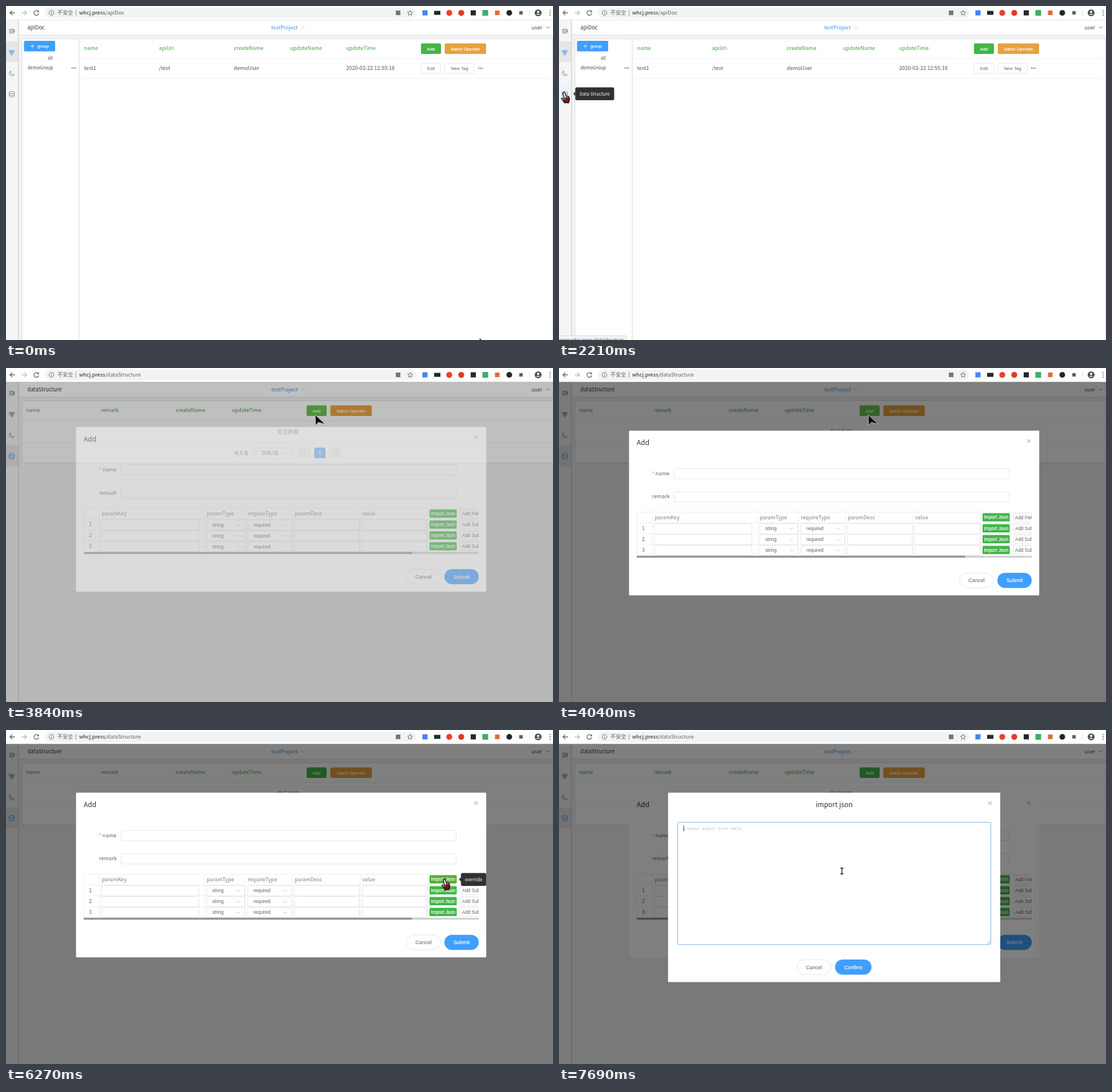
These frames come from a looping animation (957 by 585 pixels, 8000 ms). An HTML page:

```html
<!DOCTYPE html>
<html lang="zh-CN">
<head>
<meta charset="utf-8">
<title>apiDoc</title>
<style>
html, body { margin: 0; width: 100%; height: 100%; overflow: hidden; background: #fff; }
svg { display: block; width: 100vw; height: 100vh; }
text { font-family: "Noto Sans CJK SC", "Noto Sans CJK JP", "Noto Sans", sans-serif; white-space: pre; }
.ui { font-family: "Liberation Sans", Arial, sans-serif; }
.mono { font-family: "Liberation Mono", monospace; }
</style>
</head>
<body>
<svg id="stage" viewBox="0 0 957 585" preserveAspectRatio="none"></svg>
<script>
const BLUE = '#409eff', GREEN = '#43b549', ORANGE = '#e6a23c', LINE = '#dcdfe6', SOFT = '#ebeef5';
const GREY = '#606266', DARK = '#303133', HEAD = '#43a047', ICON = '#7c8086';

// Markup helpers; text is placed by its vertical centre.
const rect = (x, y, w, h, fill, stroke = 'none', r = 0, more = '') =>
  `<rect x="${x}" y="${y}" width="${w}" height="${h}" rx="${r}" fill="${fill}" stroke="${stroke}" stroke-width=".8" ${more}/>`;
const text = (x, y, s, fill = GREY, size = 9.2, more = '') =>
  `<text x="${x}" y="${y + size * .36}" font-size="${size}" fill="${fill}" ${more}>${s}</text>`;
const path = (d, stroke, w = .9, fill = 'none', more = '') =>
  `<path d="${d}" fill="${fill}" stroke="${stroke}" stroke-width="${w}" ${more}/>`;
const dot = (x, y, r, fill, stroke = 'none') =>
  `<circle cx="${x}" cy="${y}" r="${r}" fill="${fill}" stroke="${stroke}" stroke-width=".9"/>`;
const group = (id, body, more = '') => `<g id="${id}" ${more}>${body}</g>`;
const each = (list, fn) => list.map(fn).join('');
const hLine = (x, y, x2, c = SOFT) => path(`M${x} ${y}H${x2}`, c, .9);
const vLine = (x, y, y2, c = SOFT) => path(`M${x} ${y}V${y2}`, c, .9);
const down = (x, y, c, s = 3) => path(`M${x - s} ${y - s / 2}l${s} ${s}l${s} ${-s}`, c, .8);
const dots = (x, y) => each([-3, 0, 3], d => dot(x + d, y, 1, GREY));
const cross = (x, y) => path(`M${x - 3} ${y - 3}l6 6m0 -6l-6 6`, '#909399', .9);

function button(x, y, w, h, label, fill, size = 7.87, r = 2, id = '') {
  const plain = fill === '#fff';
  const ink = plain ? GREY : '#fff';
  return rect(x, y, w, h, fill, plain ? LINE : 'none', r, id && `id="${id}"`) +
    text(x + w / 2, y + h / 2, label, ink, size,
      `class="ui" text-anchor="middle" stroke="${ink}" stroke-width="${plain ? 0 : .2}"`);
}

function browserBar() {
  const ink = '#5f6368';
  return rect(0, 0, 957, 24.5, '#fff') + rect(68, 3, 650, 18, '#f1f3f4', 'none', 9) +
    path('M15.5 12H7M11 8l-4 4l4 4', ink, 1.3) +
    path('M27.500 12H36M32 8l4 4l-4 4', '#b9bcc0', 1.3) +
    path('M56.600 9.600A4.200 4.200 0 1 0 57.300 13', ink, 1.3) + path('M57.600 7.500v3.500h-3.500z', 'none', 0, ink) +
    dot(79.500, 12, 4.200, 'none', ink) + path('M79.500 11.300v3M79.500 9.300v1', ink, 1) +
    text(90, 12, '不安全', ink) + vLine(122.500, 7, 17, '#8a8d91') +
    `<text x="128" y="15.300" font-size="9.200" fill="#202124">whcj.press<tspan id="url" fill="${ink}"></tspan></text>` +
    rect(682, 8, 8, 8, '#74777b') +
    path('M707 7.500l1.300 3l3.200 .3l-2.400 2.100l.7 3.200l-2.800 -1.700l-2.800 1.700l.7 -3.200l-2.400 -2.100l3.200 -.3z', ink, .9) +
    rect(728.500, 7.500, 9, 9, '#4285f4') + rect(749, 8.500, 11, 7, '#24292e') +
    dot(775.500, 12, 5.200, '#e8432d') + dot(796.500, 12, 5.200, '#e23c20') +
    rect(813, 7.500, 9, 9, '#25282c') + rect(833.500, 7, 10, 10, '#3fae63') +
    rect(855.500, 8, 8, 8, '#e06a3a') + dot(880.500, 12, 5, '#22252b') + rect(898, 9, 6, 6, '#606266') +
    vLine(916, 7, 17, '#d0d3d6') + dot(931, 12, 6, '#4a4e54') + dot(931, 10.200, 2, '#fff') +
    path('M927.300 15.300a3.900 2.600 0 0 1 7.400 0z', 'none', 0, '#fff') +
    each([8, 12, 16], y => dot(952, y, 1, ink));
}

function sidebar() {
  const grape = each([[-3, -2], [0, -2], [3, -2], [-1.6, .8], [1.6, .8], [0, 3.500]],
    ([x, y]) => `<circle cx="${10 + x}" cy="${81 + y}" r="1.500"/>`);
  const store = '<ellipse cx="10" cy="151.500" rx="4.500" ry="2"/>' +
    '<path d="M5.500 151.500v6c0 2.700 9 2.700 9 0v-6M5.500 154.500c0 2.700 9 2.700 9 0"/>';
  return rect(0, 25, 22, 560, '#f5f5f5') +
    rect(0, 62, 21.500, 36.500, '#e6e6e6', 'none', 0, 'id="active"') +
    rect(0, 135.500, 21.500, 36.500, '#ecf5ff', 'none', 0, 'id="hover"') +
    vLine(22, 25, 585, '#bfc2c7') +
    path('M5.500 41h9M5.500 44h6M5.500 47h9M14.500 42.700v2.600l-1.800 -1.300z', '#55595f', 1) +
    group('grape', grape, 'fill="none" stroke-width=".9"') +
    path('M8.300 113.500a4.600 4.600 0 1 0 6 6.500a5 5 0 0 1 -6 -6.500z', ICON, .9) +
    group('store', store, 'fill="none" stroke-width=".9"');
}

const header = () => rect(22.500, 24.500, 935, 26.500, '#fff') + hLine(0, 24.500, 957, '#dfe1e4') +
  hLine(22, 51, 957, '#d9dbdf') +
  text(37.500, 37.500, '', '#303a45', 9.3, 'id="title"') + text(464, 37.500, 'testProject', '#3f9ae6') +
  down(519.500, 37.500, '#8fc2ec') + text(919.500, 37.500, 'user', '#41474f') + down(948, 37.500, GREY);

const headings = (list, y = 74) => each(list, ([x, s]) => text(x, y, s, HEAD));

const apiPage = () => rect(28, 57.500, 928.500, 540, '#fff', '#d4d6da') +
  rect(127, 58, 2.500, 530, '#eceef0') + hLine(129, 92, 956) + hLine(129, 126.800, 956) +
  button(31.500, 61, 54.500, 18.500, '', BLUE) + path('M43 70.200h6.500M46.200 67v6.500', '#fff', .8) +
  text(55, 70.200, 'group', '#fff', 7.87, 'class="ui" stroke="#fff" stroke-width=".2"') +
  text(73, 91.500, 'all', '#41474f', 7.87) + text(38, 108.500, 'demoGroup', '#41474f', 7.87) + dots(118.500, 108.500) +
  headings([[136.500, 'name'], [267.500, 'apiUri'], [398.500, 'createName'], [497, 'updateName'], [595, 'updateTime']]) +
  each([[136.500, 'test1'], [267.500, '/test'], [398.500, 'demoUser'], [595, '2020-02-22 12:55:18']],
    ([x, s]) => text(x, 109, s, '#50545a')) +
  button(726, 65.500, 35, 18.500, 'Add', GREEN) + button(767.500, 65.500, 72.500, 18.500, 'Batch Operate', ORANGE) +
  button(726.400, 100.400, 34.300, 18, 'Edit', '#fff') + button(767.900, 100.400, 51, 18, 'New Tag', '#fff') + dots(830, 109);

const dataPage = () => rect(28, 57.500, 940, 108.700, '#fff', '#d4d6da') +
  hLine(28, 92, 957) + hLine(28, 131.500, 957) +
  headings([[35, 'name'], [166, 'remark'], [297, 'createName'], [395, 'updateTime']]) +
  button(526, 65.500, 35, 18.500, 'Add', GREEN, 7.87, 2, 'add') +
  button(567.500, 65.500, 72.500, 18.500, 'Batch Operate', ORANGE) +
  text(475, 112, '暂无数据', '#808389') + text(399, 148.500, '共 0 条', GREY, 8.53) +
  rect(434.500, 140, 65.500, 18.300, '#fff', LINE, 2) + text(447, 149, '20条/页', GREY, 8.53) + down(491.500, 149, '#c0c4cc', 2.600) +
  rect(513, 139.500, 20, 18.500, '#f1f2f5', 'none', 1.300) + path('M524 146l-2.700 2.700l2.700 2.700', '#b4b8bf', .9) +
  rect(539.300, 139.500, 19.700, 18.500, BLUE, 'none', 1.300) +
  text(549.200, 148.500, '1', '#fff', 8.53, 'font-weight="bold" text-anchor="middle"') +
  rect(565.500, 139.500, 20, 18.500, '#f1f2f5', 'none', 1.300) + path('M574 146l2.700 2.700l-2.700 2.700', '#b4b8bf', .9);

function addDialog() {
  const small = (y, label, id) => button(741, y, 47.500, 14.500, 'Import Json', GREEN, 8.15, 1.500, id) +
    `<g clip-path="url(#tableClip)">${rect(795, y, 50, 14.500, '#fff', LINE, 1.500)}` +
    text(798, y + 7.300, label, GREY, 8.15, 'class="ui"') + '</g>';
  const select = (x, w, y, s) => rect(x, y, w, 18, '#fff', LINE, 2) +
    text(x + 10, y + 9, s, GREY, 8.15, 'class="ui"') + down(x + w - 11, y + 9, '#b4b8c0');
  const row = i => {
    const y = 272.500 + i * 19;
    return hLine(136, y - 1, 827) + text(145, y + 8, i + 1) +
      each([[167, 170.500], [504.800, 113.200], [622.800, 113.200]], ([x, w]) => rect(x, y, w, 18, '#fff', LINE, 2)) +
      select(351, 66.500, y, 'string') + select(423, 76.500, y, 'required') + small(y + 1, 'Add Sub');
  };
  return rect(122.500, 109.700, 717.700, 288.500, '#fff', 'none', 1.300) + text(136, 131, 'Add', DARK, 12) + cross(822, 128) +
    text(162.500, 184.500, '<tspan fill="#f08a5d">*</tspan> name') + text(163, 225, 'remark') +
    rect(201.400, 176, 586.400, 18, '#fff', LINE, 2) + rect(201.400, 216.700, 586.400, 18, '#fff', LINE, 2) +
    hLine(136, 252.500, 827) + each([136.400, 163, 347, 419, 501.500, 619.500, 737.500], x => vLine(x, 252.500, 329)) +
    each([[167.500, 'paramKey'], [351, 'paramType'], [423, 'requireType'], [505, 'paramDesc'], [623, 'value']],
      ([x, s]) => text(x, 261.500, s, '#7d8087')) +
    small(254.300, 'Add Field', 'import') + each([0, 1, 2], row) +
    rect(136, 328.800, 691, 3.400, '#cfd0d2') + rect(136, 328.800, 574.500, 3.400, '#929497') +
    button(700.800, 359, 59.500, 26, 'Cancel', '#fff', 9.2, 13) + button(767, 358.700, 60, 26.500, 'Submit', BLUE, 9.2, 13.200);
}

const jsonDialog = () => rect(190.800, 109.700, 581.200, 331.800, '#fff', 'none', 1.300) +
  text(481.500, 131, 'import json', DARK, 12, 'text-anchor="middle"') + cross(754, 128) +
  rect(207.500, 161.700, 548, 214, '#fff', LINE, 2, 'id="area"') +
  text(217.500, 172.700, 'please input json data', '#b9bdc6', 7.72, 'class="mono"') +
  path('M749.500 374.500l5 -5M752.500 374.500l2 -2', '#777', .7) + group('caret', vLine(218.200, 167.500, 177.500, '#222')) +
  button(416.300, 402.400, 59.800, 25.800, 'Cancel', '#fff', 9.2, 13) + button(483, 402, 63.700, 26.500, 'Confirm', BLUE, 9.2, 13.200);

const tip = (id, x, y, w, s) => group(id, rect(x, y - 11.200, w, 22.400, DARK, 'none', 2.600) +
  path(`M${x} ${y - 3.700}l-3.600 3.700l3.600 3.700z`, 'none', 0, DARK) +
  text(x + w / 2, y, s, '#fff', 7.87, 'text-anchor="middle"'));

const pointers = () =>
  group('arrow', path('M0 0L.5 18.500L5.500 13.200L17.500 16.500Z', '#e9e9e9', .7, '#0b0b0b')) +
  group('hand',
    path('M-1.500 1.200Q0 -1 1.700 1L4 7L8.500 7.500L10 12L8.500 18.500H1L-4 11.500Q-3.500 9 -1 11L1 12Z', '#111', 1.400, '#fff') +
    path('M3 9L8.500 9.500L9.300 12L7.800 17.500H1.500L-1 13L2.500 14Z', '#300508', .9, '#8c1019')) +
  group('beam', path('M-2.500 -5H2.500M-2.500 5H2.500M0 -5V5', '#111', 1.300));

const dim = id => rect(0, 24.500, 957, 561, '#000', 'none', 0, `id="${id}"`);

document.getElementById('stage').innerHTML =
  '<defs><clipPath id="tableClip"><rect x="790" y="250" width="37" height="80"/></clipPath></defs>' +
  rect(0, 0, 957, 585, '#f4f4f4') + browserBar() + header() + sidebar() +
  group('apiPage', apiPage()) + group('dataPage', dataPage()) +
  dim('dimBack') + group('addDialog', addDialog()) + dim('dimFront') + group('jsonDialog', jsonDialog()) +
  tip('tipApi', 28.500, 81, 36, 'apiDoc') + tip('tipData', 28.500, 153.700, 68, 'Data Structure') +
  tip('tipOver', 796, 261.700, 44.200, 'override') +
  group('status', rect(-3, 577.500, 121, 12, '#f3f4f5', '#d0d2d5', 2) + text(0, 585, '', GREY, 7.87, 'id="link"')) +
  pointers();

const el = {};
document.querySelectorAll('#stage [id]').forEach(n => el[n.id] = n);
const attr = (id, name, v) => el[id].setAttribute(name, v);
const alpha = (id, v) => { attr(id, 'opacity', +v); attr(id, 'visibility', +v ? 'visible' : 'hidden'); };
const label = (id, s) => { if (el[id].textContent !== s) el[id].textContent = s; };

// Pointer track: time, x, y
const track = [
  [0, 828.500, 581.500], [200, 770, 545], [600, 400, 300], [1000, 60, 105], [1200, 9, 80], [1400, 9, 86],
  [1800, 9, 138], [2010, 8.500, 151], [2410, 8.500, 151], [2610, 40, 148], [3010, 300, 112], [3420, 539, 80],
  [3600, 540, 80], [3830, 541, 82], [4240, 541, 82], [4450, 560, 130], [4650, 604, 212], [4850, 638, 251],
  [5060, 684, 257], [5260, 742, 261], [5460, 766, 261], [6868, 767, 261], [7070, 640, 255], [7270, 495, 247], [8000, 495, 247]
];

function pointerAt(t) {
  const i = Math.max(1, track.findIndex(k => k[0] >= t));
  const [a, b] = [track[i - 1], track[i]];
  const f = (t - a[0]) / (b[0] - a[0]);
  return [a[1] + (b[1] - a[1]) * f, a[2] + (b[2] - a[2]) * f];
}

// The screen refreshes about five times a second.
const snap = t => t < 3835
  ? Math.min(18, Math.floor((t + 5) / 201)) * 201
  : 3840 + Math.floor((t - 3835) / 202) * 202;

function draw(time) {
  const t = snap(time), within = (a, b) => t >= a && t < b;
  const data = t >= 2400;
  label('url', data ? '/dataStructure' : '/apiDoc');
  label('title', data ? 'dataStructure' : 'apiDoc');
  alpha('apiPage', !data);
  alpha('dataPage', data);
  attr('active', 'y', data ? 135.5 : 62);
  attr('grape', 'stroke', data ? ICON : BLUE);
  attr('store', 'stroke', data ? BLUE : ICON);
  alpha('hover', within(1790, 2400));
  alpha('tipApi', within(1190, 1590));
  alpha('tipData', within(1990, 2600));
  alpha('status', within(1190, 2600));
  label('link', 'www.whcj.press/' + (t < 1790 ? 'apiDoc' : 'dataStructure'));

  const open = t < 3830 ? 0 : t < 4030 ? .5 : 1;
  const json = t < 6460 ? 0 : t < 6660 ? .5 : 1;
  alpha('dimBack', (1 - json) * open * .5);
  alpha('dimFront', json * .5);
  alpha('addDialog', open);
  attr('addDialog', 'transform', `translate(0 ${(open - 1) * 13})`);
  alpha('jsonDialog', json);
  attr('jsonDialog', 'transform', `translate(0 ${(json - 1) * 13})`);
  attr('add', 'fill', within(3410, 3830) ? '#58ab37' : within(3830, 6250) ? '#69c34e' : GREEN);
  attr('import', 'fill', within(5450, 6460) ? '#58ab37' : within(6460, 7460) ? '#69c34e' : GREEN);
  alpha('tipOver', within(5450, 6660) ? 1 : within(6660, 6860) ? .35 : 0);
  attr('area', 'stroke', t >= 7460 ? '#5a9be0' : LINE);
  alpha('caret', t >= 7660);

  const hand = within(1190, 2600) || within(3410, 3830) || within(5450, 6460);
  const kind = hand ? 'hand' : t >= 7060 ? 'beam' : 'arrow';
  const [x, y] = pointerAt(t);
  for (const id of ['arrow', 'hand', 'beam']) {
    alpha(id, id === kind);
    attr(id, 'transform', `translate(${x} ${y})`);
  }
}

const start = performance.now();
function tick() {
  draw((performance.now() - start) % 8000);
  requestAnimationFrame(tick);
}
tick();
</script>
</body>
</html>
```
